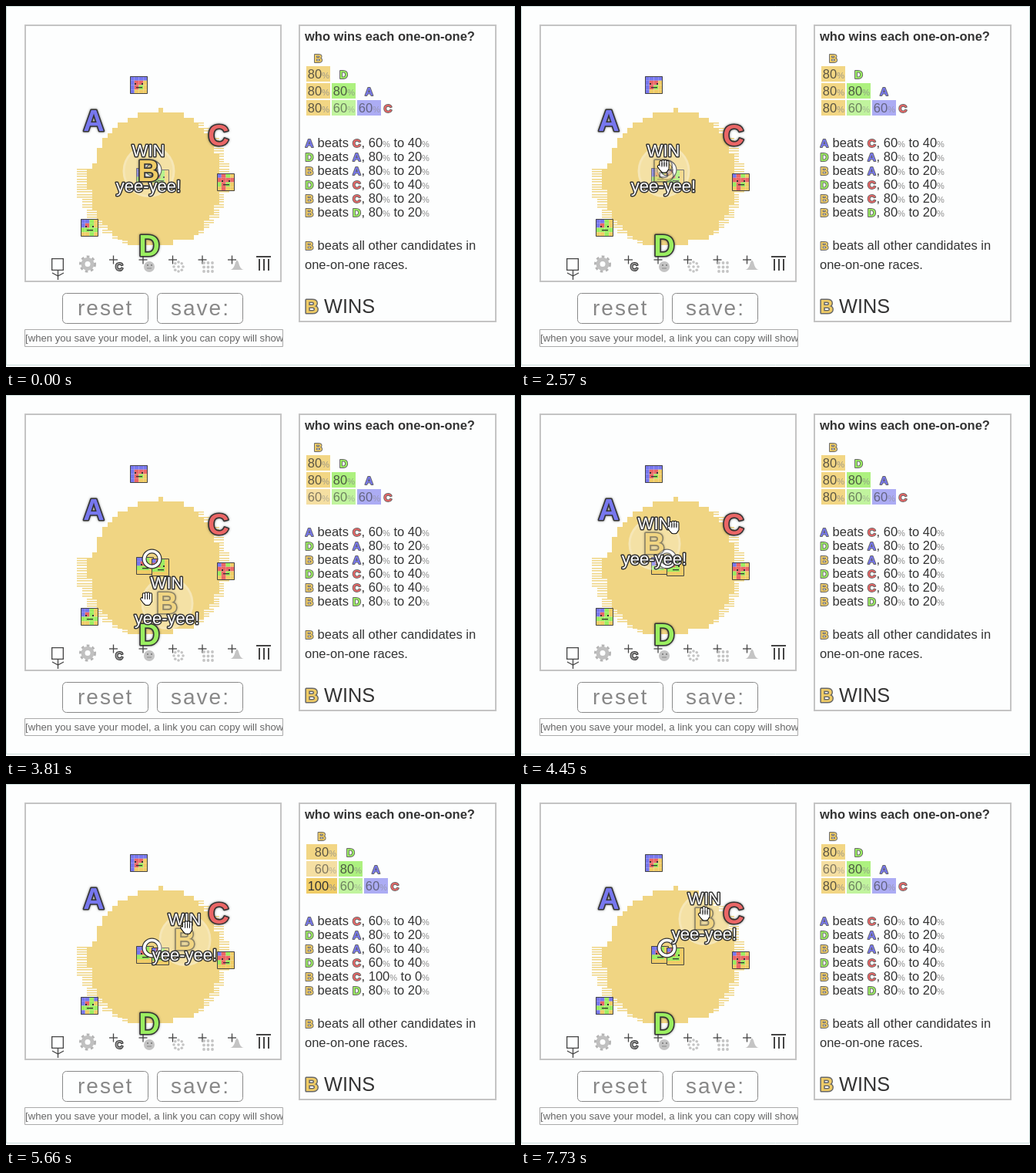
These frames come from a looping animation (661 by 468 pixels, 7.99 s). An HTML page with a canvas:

```html
<!DOCTYPE html>
<html lang="en">
<meta charset="utf-8">
<title>One-on-one races</title>
<style>
  html, body { margin: 0; width: 100%; height: 100%; overflow: hidden; background: #fdfefe; }
  canvas { display: block; }
</style>
<canvas id="stage" width="661" height="468"></canvas>
<script>
const ctx = document.getElementById('stage').getContext('2d');
const LOOP = 7990, STEP = 136;
const COLORS = { A: '#7777ee', C: '#ea6666', D: '#9aee60', B: '#f0cc66' };
const NAMES = Object.keys(COLORS);
const FIXED = { A: [114, 149], C: [276, 168], D: [185.5, 311.4] };
const VOTERS = [[172.5, 103], [108.5, 288], [285.5, 228.5], [180.5, 221.8], [201, 224.2]];

// Key points: step, x, y
const APPROACH = [[0, 88, 451], [1, 73, 405], [3, 258, 310], [4, 292, 275], [7, 235, 219], [10, 185, 207]];
const DRAG = [
  [0, 185, 214], [3, 210, 202], [5, 229, 232], [7, 209, 270], [9, 160, 258], [12, 173, 193],
  [14, 218, 177], [17, 193, 228], [19, 222, 224], [21, 232, 202], [24, 238, 175]
];

// Smooth curve through the key points
function along(keys, step) {
  const last = keys.length - 1;
  const s = Math.min(Math.max(step, 0), keys[last][0]);
  const i = Math.min(keys.findLastIndex(k => k[0] <= s), last - 1);
  const [p, q, r, w] = [-1, 0, 1, 2].map(d => keys[Math.min(Math.max(i + d, 0), last)]);
  const u = (s - q[0]) / (r[0] - q[0]);
  return [1, 2].map(k => q[k] + u / 2 * (r[k] - p[k]
    + u * (2 * p[k] - 5 * q[k] + 4 * r[k] - w[k] + u * (3 * q[k] - p[k] - 3 * r[k] + w[k]))));
}

const dist = (p, q) => Math.hypot(p[0] - q[0], p[1] - q[1]);

function election(spotB) {
  const places = { ...FIXED, B: spotB };
  const prefers = (voter, a, b) => dist(voter, places[a]) < dist(voter, places[b]);
  const share = (a, b) => 20 * VOTERS.filter(v => prefers(v, a, b)).length;
  const wins = name => NAMES.filter(other => other !== name && share(name, other) > 50).length;
  return { prefers, share, wins };
}

// Every grid cell where B would win, or tie for the most wins
const CELL = 6.6;
const region = [];
for (let i = 0; i < 2500; i++) {
  const x = 26 + i % 50 * CELL, y = 26 + Math.floor(i / 50) * CELL;
  const { wins } = election([x + CELL / 2, y + CELL / 2]);
  const best = Math.max(...['A', 'C', 'D'].map(wins));
  if (wins('B') >= best) region.push({ x, y, tie: wins('B') === best });
}

function rect(x, y, w, h, color) {
  ctx.fillStyle = color;
  ctx.fillRect(x, y, w, h);
}
function line(color, width, ...points) {
  ctx.strokeStyle = color;
  ctx.lineWidth = width;
  ctx.beginPath();
  points.forEach(p => ctx.lineTo(...p));
  ctx.stroke();
}
function frame(x, y, w, h, color, width = 1, radius = 0) {
  ctx.strokeStyle = color;
  ctx.lineWidth = width;
  ctx.beginPath();
  ctx.roundRect(x + width / 2, y + width / 2, w - width, h - width, radius);
  ctx.stroke();
}
function disc(x, y, r, color) {
  ctx.fillStyle = color;
  ctx.beginPath();
  ctx.arc(x, y, r, 0, 7);
  ctx.fill();
}
function ring(x, y, r, color, width) {
  ctx.strokeStyle = color;
  ctx.lineWidth = width;
  ctx.beginPath();
  ctx.arc(x, y, r, 0, 7);
  ctx.stroke();
}
const font = (size, weight = '') => `${weight} ${size}px "Liberation Sans", Arial, sans-serif`;

function text(str, x, y, size, color = '#333', weight) {
  ctx.font = font(size, weight);
  ctx.textAlign = 'left';
  ctx.fillStyle = color;
  ctx.fillText(str, x, y);
  return ctx.measureText(str).width;
}
function outlined(str, x, y, size, fill, stroke, width, weight, target = ctx) {
  target.font = font(size, weight);
  target.textAlign = 'center';
  target.lineJoin = 'round';
  target.strokeStyle = stroke;
  target.lineWidth = width;
  target.strokeText(str, x, y);
  target.shadowBlur = 0;
  target.fillStyle = fill;
  target.fillText(str, x, y);
  target.lineJoin = 'miter';
}
const badge = (name, x, y, size = 15) =>
  outlined(name, x, y, size, COLORS[name], '#666', size / 8, 'bold');

// Mixed line: candidate names become badges, percent signs are small
function run(x, y, parts) {
  for (const part of parts) {
    if (COLORS[part]) {
      badge(part, x + 6, y);
      x += 12;
    } else {
      x += part === '%' ? text(part, x, y, 11, '#888') : text(part, x, y, 16.5);
    }
  }
}

function drawRegion() {
  for (const { x, y, tie } of region) {
    const top = Math.round(y), height = Math.round(y + CELL) - top;
    const left = Math.round(x), width = Math.round(x + CELL) - left;
    if (!tie) rect(left, top, width, height, '#f0d583');
    else for (const dy of [0, 3]) rect(left, top + dy, width, 1.5, '#f0d583');
  }
}

// Each cell shows which of the two candidates this voter prefers
function drawVoter(voter, prefers) {
  const x = Math.floor(voter[0] - 11.5), y = Math.floor(voter[1] - 11.5);
  NAMES.forEach((a, i) => NAMES.forEach((b, j) =>
    rect(x + j * 5.75, y + i * 5.75, 5.75, 5.75, COLORS[prefers(voter, a, b) ? a : b])));
  frame(x, y, 23, 23, '#444');
  rect(x + 6, y + 9, 2, 2, '#333');
  rect(x + 15, y + 9, 2, 2, '#333');
  rect(x + 8, y + 14, 8, 1.3, '#333');
}

function letterSprite(name) {
  const sprite = document.createElement('canvas');
  sprite.width = sprite.height = 60;
  const g = sprite.getContext('2d');
  g.shadowColor = 'rgba(0,0,0,.5)';
  g.shadowBlur = 3;
  outlined(name, 30, 43, 38, COLORS[name], '#333', 3.2, 'bold', g);
  return sprite;
}
const sprites = Object.fromEntries(NAMES.map(name => [name, letterSprite(name)]));

function drawCandidate(name, [x, y], alpha = 1) {
  ctx.globalAlpha = alpha;
  ctx.drawImage(sprites[name], Math.round(x - 30), Math.round(y - 30));
  ctx.globalAlpha = 1;
}

function drawTools() {
  const grey = '#c4c4c4', dark = '#444';
  frame(59, 327, 16, 16, dark, 1.3);
  line(dark, 1.3, [67.5, 343], [67.5, 355]);
  line(dark, 1.3, [60, 346], [67.5, 350], [75, 346]);

  ctx.setLineDash([3.6, 3.6]);
  ring(106, 334.5, 9.5, '#b4b4b4', 3);
  ctx.setLineDash([]);
  ring(106, 334.5, 6, '#c0c0c0', 5);

  for (let i = 0; i < 5; i++) {
    const x = 139.5 + i * 38.5;
    line(dark, 1.3, [x - 5.5, 329], [x + 5.5, 329]);
    line(dark, 1.3, [x, 323.5], [x, 334.5]);
  }
  outlined('C', 147, 343, 14, '#999', '#333', 2, 'bold');

  disc(186, 338, 7, grey);
  rect(183, 335, 2, 2, '#888');
  rect(188, 335, 2, 2, '#888');
  line('#888', 1, [183, 340], [189, 340]);

  disc(224, 338, 1.8, grey);
  for (let i = 0; i < 8; i++) {
    const a = i * Math.PI / 4;
    disc(224 + 6 * Math.cos(a), 338 + 6 * Math.sin(a), 1.8, grey);
  }
  for (let i = 0; i < 9; i++) disc(257 + i % 3 * 5.5, 333 + (i / 3 | 0) * 5.5, 1.9, grey);

  ctx.fillStyle = grey;
  ctx.beginPath();
  ctx.moveTo(291, 342);
  ctx.bezierCurveTo(298, 341, 297, 330, 300, 330);
  ctx.bezierCurveTo(303, 330, 302, 341, 309, 342);
  ctx.fill();

  rect(325, 324, 19, 2, dark);
  for (let i = 0; i < 3; i++) rect(328 + i * 6, 328, 2, 15, dark);
}

function drawControls() {
  for (const [label, x, textX] of [['reset', 73, 93], ['save:', 196, 214]]) {
    frame(x, 372, 112, 40, '#888', 1, 5);
    ctx.letterSpacing = '2px';
    text(label, textX, 401, 28, '#888');
    ctx.letterSpacing = '0px';
  }
  ctx.save();
  ctx.beginPath();
  ctx.rect(24, 419, 336, 23);
  ctx.clip();
  text('[when you save your model, a link you can copy will show', 25, 435, 13.15, '#666');
  ctx.restore();
  frame(24, 419, 336, 23, '#aaa');
}

function drawTable(share) {
  const rows = ['D', 'A', 'C'], columns = ['B', 'D', 'A'];
  let x = 390;
  columns.forEach((name, c) => {
    const shares = rows.map(other => share(name, other));
    const width = c === 0 && shares.includes(100) ? 40 : 31;
    badge(name, x + width / 2, 72.5 + c * 21.5);
    for (let r = c; r < 3; r++) {
      const y = 78 + r * 22, digits = String(shares[r]);
      ctx.globalAlpha = shares[r] / 100;
      rect(x, y, width, 20, COLORS[name]);
      run(x + width - 10.8 - digits.length * 9.18, y + 16, [digits, '%']);
      ctx.globalAlpha = 1;
    }
    x += width + 2;
  });
  badge('C', x + 7, 137.5);
}

function drawReport(share) {
  frame(380, 24, 257, 386, '#c4c4c4', 2);
  text('who wins each one-on-one?', 388, 45, 16.5, '#333', 'bold');
  drawTable(share);
  ['AC', 'DA', 'BA', 'DC', 'BC', 'BD'].forEach(([a, b], i) => {
    const won = share(a, b);
    run(388, 183 + i * 18, [a, ' beats ', b, ', ', String(won), '%', ' to ', String(100 - won), '%']);
  });
  run(388, 316, ['B', ' beats all other candidates in']);
  run(388, 341, ['one-on-one races.']);
  badge('B', 397, 398, 24);
  text('WINS', 413, 398, 25.3);
}

function drawArrow(x, y) {
  ctx.fillStyle = '#000';
  ctx.beginPath();
  [[0, 0], [0, 24], [5, 19], [9.5, 30], [13, 28.5], [8.5, 18], [16, 18]]
    .forEach(([dx, dy]) => ctx.lineTo(x + dx, y + dy));
  ctx.fill();
}

function drawHand(x, y, shape) {
  const tops = { point: [-8, -1, 0, 1], closed: [-5, -6, -6, -5], open: [-6, -8, -7, -5] }[shape];
  ctx.lineCap = ctx.lineJoin = 'round';
  for (const [color, grow] of [['#000', 2], ['#fff', 0]]) {
    tops.forEach((top, i) => {
      const fx = x - 3.5 + i * 3;
      line(color, 2.2 + grow, [fx, y + top], [fx, y + 4]);
    });
    line(color, 2.4 + grow, [x - 6, y + 1], [x - 3, y + 5]);
    line(color, 5 + grow, [x - 1.5, y + 4], [x + 3.5, y + 4], [x + 2.5, y + 6], [x - 0.5, y + 6], [x - 1.5, y + 4]);
  }
  if (shape !== 'point') {
    for (const dx of [-2, 1, 4]) line('#000', 0.7, [x + dx, y - 4], [x + dx, y]);
  }
  ctx.lineCap = 'butt';
  ctx.lineJoin = 'miter';
}

function drawPointer(t, dragStep) {
  if (t < 540) return;
  const spot = along(APPROACH, Math.floor((t - 540) / STEP));
  if (t < 1760) return drawArrow(...spot);
  if (t < 2570) return drawHand(...spot, 'point');
  // The hand runs one step ahead of the candidate it drags
  const [x, y] = along(DRAG, dragStep + 1);
  drawHand(x, y - 7, t < 7730 ? 'closed' : 'open');
}

function draw(t) {
  const dragStep = Math.floor((t - 2800) / STEP);
  const [bx, by] = along(DRAG, dragStep).map(Math.round);
  const { prefers, share } = election([bx, by]);

  rect(0, 0, 661, 468, '#fdfefe');
  frame(0, 0, 661, 466, '#cbdcda');

  drawRegion();
  frame(24, 24, 334, 334, '#c4c4c4', 2);
  drawTools();
  VOTERS.forEach(v => drawVoter(v, prefers));
  ring(189.5, 212.5, 10, '#333', 6);
  ring(189.5, 212.5, 10, '#fff', 3.6);

  disc(bx + 0.5, by, 34, 'rgba(255,255,255,.27)');
  ring(bx + 0.5, by, 32.5, 'rgba(255,255,255,.2)', 3);
  for (const name in FIXED) drawCandidate(name, FIXED[name]);
  drawCandidate('B', [bx, by], t < 1760 ? 1 : 0.55);
  outlined('WIN', bx, by - 19, 22, '#fff', '#333', 3);
  outlined('yee-yee!', bx, by + 27, 22, '#fff', '#333', 3);

  drawControls();
  drawReport(share);
  drawPointer(t, dragStep);
}

const start = performance.now();
function tick() {
  draw((performance.now() - start) % LOOP);
  requestAnimationFrame(tick);
}
tick();
</script>
</html>
```
